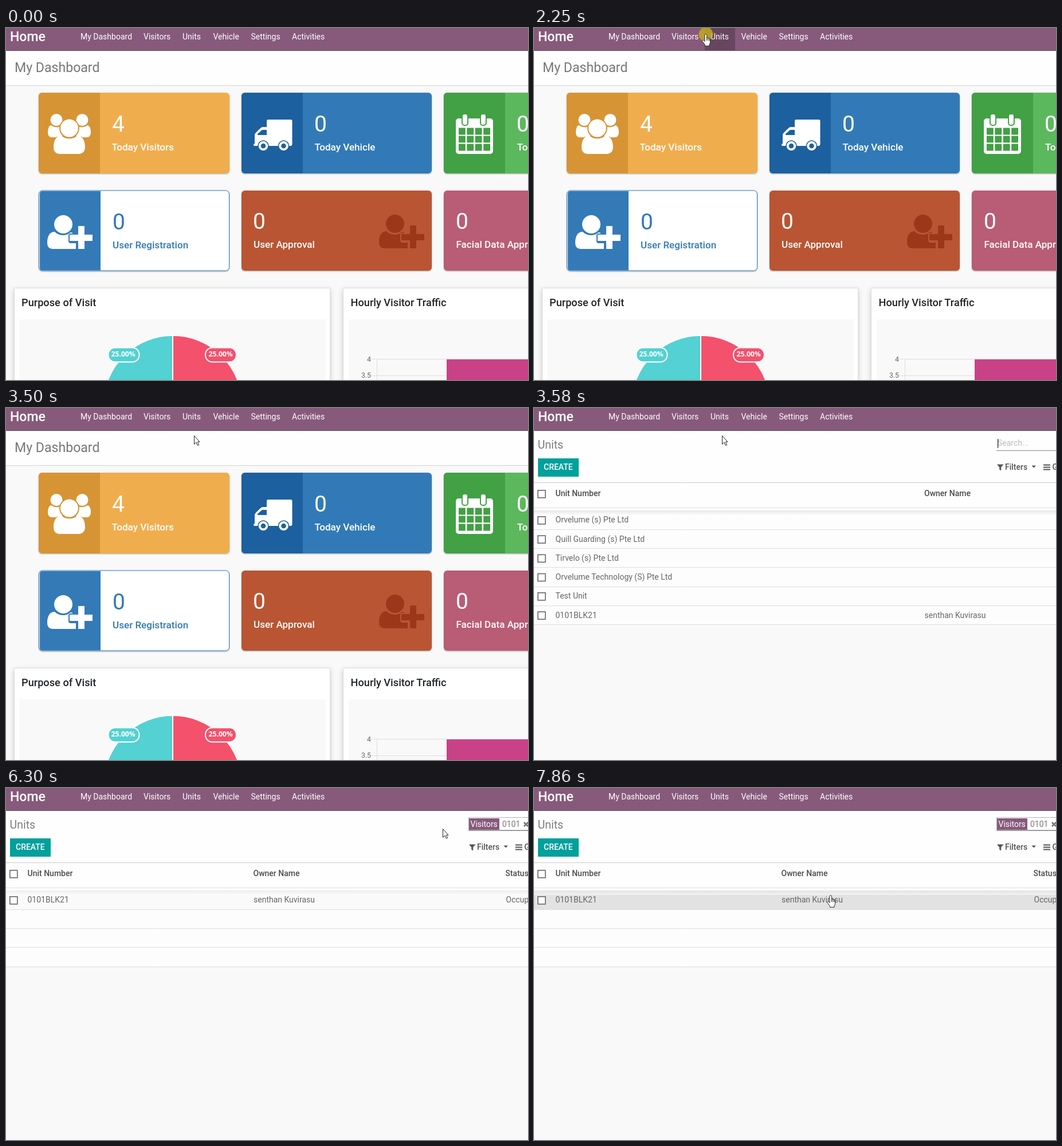
Write an HTML page that moves like this. It is 911x615 px and loops after 8 s.

```html
<!DOCTYPE html>
<html lang="en">
<head>
<meta charset="utf-8">
<title>Units</title>
<style>
html, body { margin: 0; width: 100%; height: 100%; overflow: hidden; background: #f9f9f9; }
svg { display: block; }
text { font: 14px Roboto, sans-serif; white-space: pre; }
.med, .h text { font-weight: 500; }
.num { font-size: 39px; }
.cap { font-size: 17.1px; font-weight: 500; }
.head { font-size: 18.2px; font-weight: 500; fill: #212529; }
.pct { font: 700 12.2px "Open Sans", sans-serif; fill: #fff; }
.tick { font-size: 12.3px; fill: #666; }
.cells text { fill: #666; }
.h text { fill: #4c4c4c; }
.drop text { fill: #017e84; }
.drop tspan { font-style: italic; }
.line { stroke: #dedede; }

/* timed visibility, one 8 s clock */
.t { opacity: 0; animation: 8s step-end infinite; }
.dash { animation-name: dash; }
.list { animation-name: list; }
.all { animation-name: all; }
.found { animation-name: found; }
.nav1 { animation-name: nav1; }
.nav2 { animation-name: nav2; }
.menu { animation-name: menu; }
.pick { animation-name: pick; }
.click { animation-name: click; }
.hint { animation-name: hint; }
.drop { animation-name: drop; }
.facet { animation-name: facet; }
.k1 { animation-name: drop; }
.k2 { animation-name: k2; }
.k3 { animation-name: k3; }
.k4 { animation-name: k4; }
.caret { animation-name: blink, type; }
.hover { animation-name: hover; }
.press { animation-name: press; }
.arrow { animation-name: arrow; }
.hand { animation-name: hand; }
@keyframes dash { 0% { opacity: 1 } 44.75% { opacity: 0 } }
@keyframes list { 44.75%, 100% { opacity: 1 } }
@keyframes all { 44.75% { opacity: 1 } 78.75% { opacity: 0 } }
@keyframes found { 78.75%, 100% { opacity: 1 } }
@keyframes nav1 { 10.55% { opacity: 1 } 23.125% { opacity: 0 } }
@keyframes nav2 { 23.125% { opacity: 1 } 43.75% { opacity: 0 } }
@keyframes menu { 30% { opacity: 1 } 43.75% { opacity: 0 } }
@keyframes pick { 40.875% { opacity: 1 } 43.75% { opacity: 0 } }
@keyframes click {
  28.125%, 42.75%, 97.375% { opacity: 1 }
  30%, 43.75%, 98.25% { opacity: 0 }
}
@keyframes hint { 44.75% { opacity: 1 } 63.375% { opacity: 0 } }
@keyframes drop { 63.375% { opacity: 1 } 77.875% { opacity: 0 } }
@keyframes k2 { 64.25% { opacity: 1 } 77.875% { opacity: 0 } }
@keyframes k3 { 66.25% { opacity: 1 } 77.875% { opacity: 0 } }
@keyframes k4 { 68.125% { opacity: 1 } 77.875% { opacity: 0 } }
@keyframes facet { 77.875%, 100% { opacity: 1 } }
@keyframes blink { 44.75%, 58.5% { opacity: 1 } 51.625%, 75% { opacity: 0 } }
@keyframes type {
  63.375% { transform: translateX(7.8px) }
  64.25% { transform: translateX(15.6px) }
  66.25% { transform: translateX(23.4px) }
  68.125%, 100% { transform: translateX(31px) }
}
@keyframes hover { 93.5%, 100% { opacity: 1 } }
@keyframes press { 97.375%, 100% { opacity: 1 } }
@keyframes arrow { 0%, 43.75% { opacity: 1 } 10.55%, 93.5% { opacity: 0 } }
@keyframes hand { 10.55%, 93.5%, 100% { opacity: 1 } 43.75% { opacity: 0 } }

.cursor { animation: move 8s linear infinite; }
@keyframes move {
  0% { transform: translate(209px, -17px) }
  7.625% { transform: translate(209px, -17px); animation-timing-function: steps(6, start) }
  13.475% { transform: translate(252px, 14px) }
  20.125% { transform: translate(252px, 14px); animation-timing-function: steps(4, start) }
  24.125% { transform: translate(300px, 11px) }
  34% { transform: translate(300px, 11px); animation-timing-function: steps(8, start) }
  41.8625% { transform: translate(328px, 48px) }
  47.625% { transform: translate(328px, 48px); animation-timing-function: steps(8, start) }
  55.4875% { transform: translate(762px, 71px) }
  85.5% { transform: translate(762px, 71px); animation-timing-function: steps(9, start) }
  94.5%, 100% { transform: translate(518px, 188px) }
}
</style>
</head>
<body>
<svg width="911" height="615" viewBox="0 0 911 615">
  <defs>
    <filter id="soft" x="-10%" y="-10%" width="120%" height="125%">
      <feDropShadow dx="0" dy="1" stdDeviation="1" flood-opacity=".35"/>
    </filter>
    <filter id="lift" x="-20%" y="-20%" width="140%" height="150%">
      <feDropShadow dx="0" dy="3" stdDeviation="4" flood-opacity=".2"/>
    </filter>
    <linearGradient id="fade" x2="0" y2="1">
      <stop stop-color="#e6e6e6"/><stop offset="1" stop-color="#fdfdfd"/>
    </linearGradient>
    <rect id="box" x="6.8" y="-6.2" width="13" height="13" fill="#fff" stroke="#666" stroke-width="1.6"/>
    <g id="person" fill="currentColor">
      <circle cx="28" cy="17" r="16"/>
      <path d="M0 49c0-11 4-19 13-19 4 4 9 6 15 6 5 0 9-2 13-5 1 0 3 1 4 2h-4q-4 0-4 3v10q0 4 4 4h9v10H10Q0 60 0 49z"/>
      <path d="M39 35H54V20H65V35H79V46H65V60H54V46H39z"/>
    </g>
    <clipPath id="c1"><rect x="57" y="113" width="333" height="141" rx="6"/></clipPath>
    <clipPath id="c2"><rect x="411" y="113" width="332" height="141" rx="6"/></clipPath>
    <clipPath id="c3"><rect x="764" y="113" width="333" height="141" rx="6"/></clipPath>
  </defs>

  <rect width="911" height="615" fill="#f9f9f9"/>

  <!-- dashboard -->
  <g class="t dash">
    <rect y="40" width="911" height="60" fill="#fefefe"/>
    <path class="line" d="M0 100.5H911" style="stroke:#d2d2d2"/>
    <text x="15" y="77" fill="#777" style="font-size:23.1px">My Dashboard</text>

    <g filter="url(#soft)">
      <g clip-path="url(#c1)">
        <rect x="57" y="113" width="333" height="141" fill="#f0ad4e"/>
        <rect x="57" y="113" width="107" height="141" fill="#d69434"/>
      </g>
      <g clip-path="url(#c2)">
        <rect x="411" y="113" width="332" height="141" fill="#337ab7"/>
        <rect x="411" y="113" width="107" height="141" fill="#1c619f"/>
      </g>
      <g clip-path="url(#c3)">
        <rect x="764" y="113" width="333" height="141" fill="#5cb85c"/>
        <rect x="764" y="113" width="107" height="141" fill="#43a045"/>
      </g>
      <rect x="57.5" y="284" width="332" height="140" rx="6" fill="#fff" stroke="#337ab7"/>
      <rect x="411" y="284" width="332" height="140" rx="6" fill="#b95433"/>
      <rect x="764" y="284" width="333" height="140" rx="6" fill="#b95c74"/>
    </g>
    <path d="M165 285V423.500H63q-4 0-4-5V290q0-5 4-5z" fill="#337ab7"/>

    <g fill="#fff">
      <!-- visitors icon -->
      <circle cx="88" cy="160.500" r="10.500"/>
      <circle cx="133" cy="160.500" r="10.500"/>
      <path id="side" d="M73 182c0-6 2-12 6-12 5 4 11 4 16 2-1 8 1 13 4 17-6 0-9 0-12 2h-7c-4 0-7-3-7-9z"/>
      <use href="#side" transform="matrix(-1 0 0 1 221 0)"/>
      <circle cx="110.500" cy="175" r="16.500" stroke="#d69434" stroke-width="2"/>
      <path d="M83 208c0-10 4-20 13-20 8 7 21 7 29 0 9 0 13 10 13 20 0 8-5 12-11 12H94c-7 0-11-4-11-12z"/>
      <!-- truck icon -->
      <path d="M457 160h40q2.500 0 2.500 2.500V203q0 3-3 3H435q-3 0-3-2 0-2 2-2V187q0-2 2-4l8-8q2-2 4-2h7v-10.500q0-2.500 2-2.500z"/>
      <path d="M439 187v-2l8-7h8v9z" fill="#1c619f"/>
      <g stroke="#1c619f" stroke-width="1.500">
        <circle cx="449" cy="206" r="9"/><circle cx="484.500" cy="206" r="9"/>
      </g>
      <g fill="#1c619f"><circle cx="449" cy="206" r="4.300"/><circle cx="484.500" cy="206" r="4.300"/></g>
      <!-- calendar icon -->
      <rect x="785" y="158" width="65" height="62" rx="5"/>
      <g stroke="#43a045" stroke-width="2">
        <rect x="796" y="150" width="10" height="20" rx="4"/>
        <rect x="828" y="150" width="10" height="20" rx="4"/>
      </g>
      <path d="M790 180.500H845M790 194.300H845M790 208.500H845" stroke="#43a045" stroke-width="11.800" stroke-dasharray="11.800 2.600"/>

      <text class="num" x="185" y="181">4</text>
      <text class="cap" x="184.500" y="214">Today Visitors</text>
      <text class="num" x="538" y="181">0</text>
      <text class="cap" x="538.500" y="214">Today Vehicle</text>
      <text class="num" x="891" y="181">0</text>
      <text class="cap" x="892" y="214">Today Units</text>
      <text class="num" x="431" y="351">0</text>
      <text class="cap" x="432" y="384">User Approval</text>
      <text class="num" x="785" y="351">0</text>
      <text class="cap" x="785.500" y="384">Facial Data Approval</text>
    </g>
    <g fill="#337ab7">
      <text class="num" x="186" y="352">0</text>
      <text class="cap" x="186" y="385">User Registration</text>
    </g>
    <use href="#person" x="72" y="326" color="#fff"/>
    <use href="#person" x="651" y="325" color="#9c3819"/>

    <!-- charts -->
    <g fill="#fff" stroke="#e0e0e0" filter="url(#lift)">
      <rect x="14.500" y="454.500" width="551" height="220"/>
      <rect x="588.500" y="454.500" width="551" height="220"/>
    </g>
    <rect x="23" y="509" width="535" height="106" fill="#f9f9f9"/>
    <rect x="598" y="509" width="313" height="106" fill="#f9f9f9"/>
    <text class="head" x="27" y="486">Purpose of Visit</text>
    <text class="head" x="601.500" y="486">Hourly Visitor Traffic</text>
    <g stroke="#fff" stroke-width="2">
      <path d="M291 658V537A121 121 0 0 0 170 658z" fill="#54d1d2"/>
      <path d="M291 658V537A121 121 0 0 1 412 658z" fill="#f4516c"/>
      <rect x="178.500" y="558.500" width="54" height="25" rx="12" fill="#54d1d2"/>
      <rect x="348" y="558.500" width="54" height="25" rx="12" fill="#f4516c"/>
    </g>
    <text class="pct" x="183.500" y="574">25.00%</text>
    <text class="pct" x="353.500" y="574">25.00%</text>
    <path class="line" d="M637 578.500H911M637 607.500H911M647.500 578V615"/>
    <rect x="769" y="579" width="142" height="36" fill="#c94287"/>
    <text class="tick" x="637" y="583" text-anchor="end">4</text>
    <text class="tick" x="637" y="611" text-anchor="end">3.5</text>
  </g>

  <!-- unit list -->
  <g class="t list">
    <rect y="40" width="911" height="139" fill="#fefefe"/>
    <text x="6.500" y="71" fill="#7c7c7c" style="font-size:19.5px">Units</text>
    <rect x="7" y="88" width="71" height="32" fill="#00a09d"/>
    <text class="med" x="17" y="108" fill="#fff">CREATE</text>
    <path d="M0 130.500H911" stroke="#ccc"/>
    <g fill="#555">
      <path d="M808 98.500h11.500l-4.300 5v6l-3-2v-4zM868.500 100.500h7.500l-3.700 4zM889 98.500h12v2h-12zM889 102.500h12v2h-12zM889 106.500h12v2h-12z"/>
      <text class="med" x="822" y="108">Filters</text>
      <text class="med" x="904.500" y="108">Group By</text>
    </g>
    <path d="M807 74.500H911" stroke="#888"/>
    <text class="t hint" x="809" y="66" fill="#bbb">Search...</text>

    <g class="t all">
      <rect y="179" width="911" height="199" fill="#fdfdfd"/>
      <rect y="179" width="911" height="8" fill="url(#fade)"/>
      <path class="line" d="M0 212.500H911M0 245.500H911M0 278.500H911M0 312.500H911M0 345.500H911M0 378.500H911"/>
      <use href="#box" y="196"/><use href="#box" y="229.300"/><use href="#box" y="262.500"/>
      <use href="#box" y="295.700"/><use href="#box" y="329"/><use href="#box" y="362.300"/>
      <g class="cells">
        <text x="37.500" y="200">Orvelume (s) Pte Ltd</text>
        <text x="37.500" y="233.500">Quill Guarding (s) Pte Ltd</text>
        <text x="37.500" y="266.500">Tirvelo (s) Pte Ltd</text>
        <text x="37.500" y="300">Orvelume Technology (S) Pte Ltd</text>
        <text x="37.500" y="333">Test Unit</text>
        <text x="37.500" y="366.500">0101BLK21</text>
        <text x="681.500" y="366.500">senthan Kuvirasu</text>
      </g>
      <g class="h"><text x="681" y="154">Owner Name</text></g>
    </g>

    <g class="t found">
      <rect y="179" width="911" height="133" fill="#fdfdfd"/>
      <rect y="179" width="911" height="33" fill="#fafafa"/>
      <rect class="t hover" y="179" width="911" height="33" fill="#f6f6f6"/>
      <rect class="t press" y="179" width="911" height="33" fill="#e2e2e2"/>
      <rect y="179" width="911" height="8" fill="url(#fade)" opacity=".6"/>
      <path class="line" d="M0 212.500H911M0 245.500H911M0 278.500H911M0 312.500H911"/>
      <use href="#box" y="196"/>
      <g class="cells">
        <text x="37.500" y="200">0101BLK21</text>
        <text x="432" y="200">senthan Kuvirasu</text>
        <text x="872.500" y="200">Occupied</text>
      </g>
      <g class="h">
        <text x="431.500" y="154">Owner Name</text>
        <text x="871.500" y="154">Status</text>
      </g>
    </g>

    <path class="line" d="M0 174.500H911"/>
    <use href="#box" y="150"/>
    <g class="h"><text x="37.500" y="154">Unit Number</text></g>

    <!-- search box -->
    <g fill="#555">
      <text class="t k1" x="809" y="66">0</text>
      <text class="t k2" x="816.900" y="66">1</text>
      <text class="t k3" x="824.700" y="66">0</text>
      <text class="t k4" x="832.600" y="66">1</text>
    </g>
    <rect class="t caret" x="809" y="54" width="1.200" height="16" fill="#222"/>
    <g class="t drop">
      <rect x="807.500" y="74.500" width="200" height="96" fill="#fff" stroke="#ccc" filter="url(#lift)"/>
      <rect x="808" y="82" width="103" height="20" fill="#f5f5f5"/>
      <path d="M815 129.500l3.800 4-3.800 4z" fill="#017e84"/>
      <text x="834.500" y="96">Search <tspan>Visitors</tspan></text>
      <text x="834.500" y="117">Search <tspan>Name</tspan></text>
      <text x="834.500" y="137">Search <tspan>Block</tspan></text>
      <text x="834.500" y="158">Search <tspan>Mobile</tspan></text>
    </g>
    <g class="t facet">
      <rect x="807.500" y="51.500" width="120" height="22" fill="#fff" stroke="#b5b5b5"/>
      <rect x="808" y="53" width="53" height="20" fill="#875a7b"/>
      <text x="810.500" y="67.500" fill="#fff">Visitors</text>
      <text x="866" y="67.500" fill="#777">0101</text>
      <path d="M904 60l7 7M911 60l-7 7" stroke="#777" stroke-width="2.800"/>
    </g>
  </g>

  <!-- top bar -->
  <rect width="911" height="40" fill="#875a7b"/>
  <rect y="39" width="911" height="1" fill="#6c4862"/>
  <rect class="t nav1" x="230" width="68" height="39" fill="#68465f"/>
  <rect class="t nav2" x="298" width="53" height="39" fill="#68465f"/>
  <g fill="#fff">
    <text class="med" x="7" y="23" style="font-size:23px">Home</text>
    <text x="130" y="20">My Dashboard</text>
    <text x="240" y="20">Visitors</text>
    <text x="308" y="20">Units</text>
    <text x="361.500" y="20">Vehicle</text>
    <text x="427.500" y="20">Settings</text>
    <text x="499" y="20">Activities</text>
  </g>

  <g class="t menu">
    <rect x="298.500" y="39.500" width="105" height="69" fill="#fff" stroke="#ddd" filter="url(#lift)"/>
    <rect class="t pick" x="299" y="45" width="104" height="28" fill="#ececec"/>
    <g fill="#4c4c4c">
      <text x="318" y="64">Units</text>
      <text x="318" y="92">Blocks</text>
    </g>
  </g>

  <g class="cursor">
    <circle class="t click" r="12.500" fill="#c4ad1f" fill-opacity=".82"/>
    <path class="t arrow" d="M.5.5V15.300L4 12l2.400 5.400 2.200-1-2.300-5.200H10z" fill="#fff" stroke="#222"/>
    <path class="t hand" d="M-2 1.500Q-2-.3-.3-.3T1.500 1.500V7q1-1 2.500 0 1.200-.8 2.300.3 1.400-.5 1.400 1.400V13q0 3-1.700 5v2.300H-1.500V18.500L-6 12.500q-.8-1.700.6-2.200 1.200-.2 2 .8L-2 12.500zM1.500 7v4M4 7.200v4M6.300 7.600v3.600" fill="#fff" stroke="#222"/>
  </g>
</svg>
</body>
</html>
```
